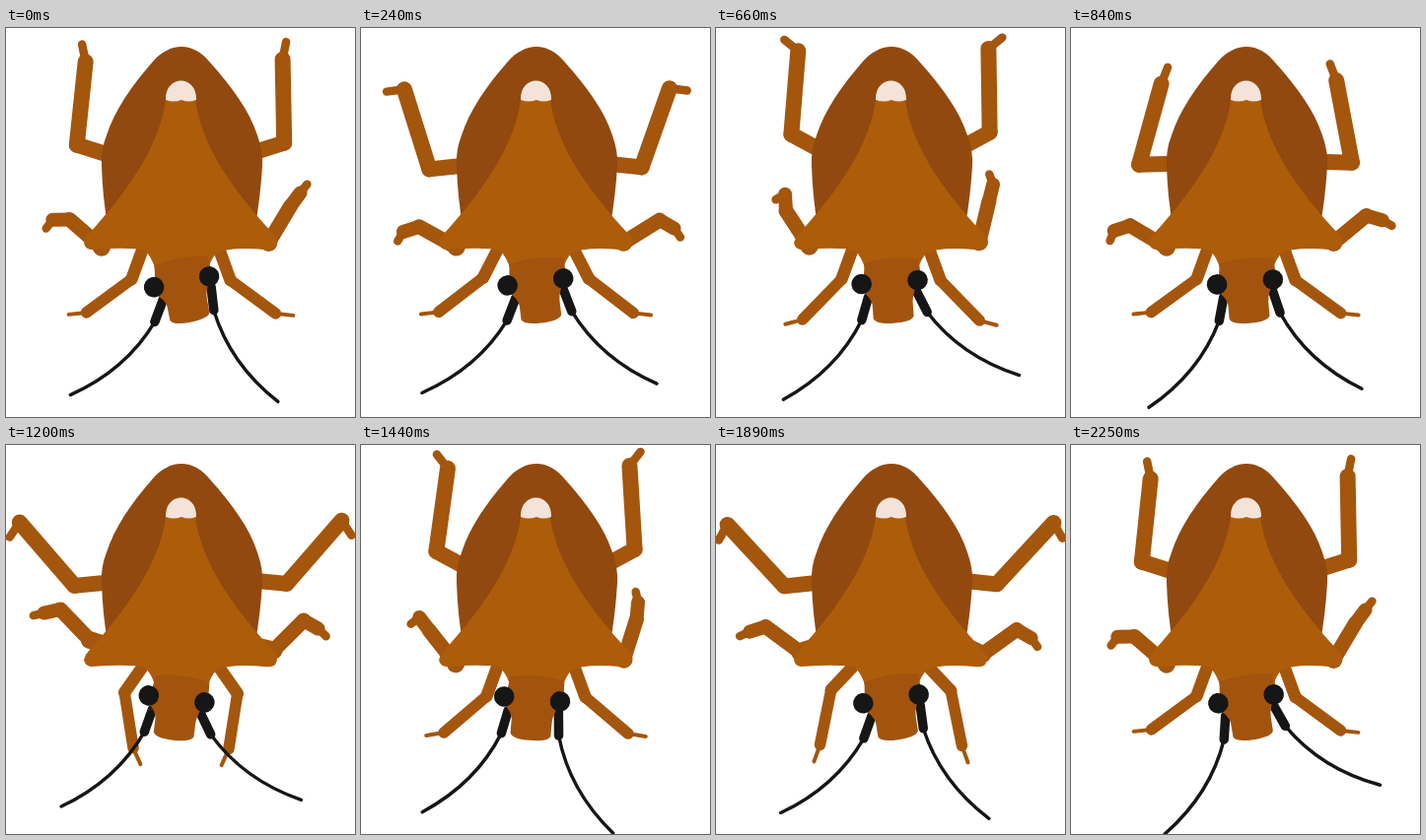
An HTML page with a canvas that plays this animation: 354x395 px, repeating every 2.28 s.

```html
<!DOCTYPE html>
<html lang="en">
<head>
<meta charset="utf-8">
<title>Walking bug</title>
<style>
  html, body { margin: 0; width: 100%; height: 100%; overflow: hidden; background: #fff; }
  canvas { display: block; }
</style>
</head>
<body>
<canvas id="stage" width="354" height="395"></canvas>
<script>
const ctx = document.getElementById('stage').getContext('2d');
const RAD = Math.PI / 180;
const STEP = 30, FRAMES = 76, STRIDE = 25;
const COLOR = {
  leg: '#a4560d', abdomen: '#91490f', shield: '#ad5c0a',
  head: '#a2540e', spot: '#f3e3d9', dark: '#161616'
};

// Rises to 1 once per stride, at peak; a higher sharpness makes it shorter.
const pulse = (phase, peak, sharpness) =>
  ((1 + Math.cos(2 * Math.PI * (phase - peak) / STRIDE)) / 2) ** sharpness;

// A limb segment: its resting angle plus swings of [degrees, peak, sharpness].
const segment = (width, length, rest, ...swings) => ({
  width, length,
  angle: phase => RAD * swings.reduce(
    (sum, [amount, peak, sharpness]) => sum + amount * pulse(phase, peak, sharpness), rest)
});

// Angles are those of a right leg; side -1 mirrors them.
const hindLeg = (side, x, y, tuck) => ({ side, x, y, segments: [
  segment(16, 61, 6, [-35, 22.5, 4]),
  segment(16, 85, -47, [-tuck, 1, 1], [13, 0, 20]),
  segment(8.5, 18, 61, [-130, 1, 1], [-50, 3, 10])
] });

const frontLeg = (side, x, y) => ({ side, x, y, segments: [
  segment(12.5, 31, 70, [-24, 12.3, 4]),
  segment(11.5, 57, 36, [66, 16, 3]),
  segment(4, 18, 6, [115, 16, 4])
] });

const middleLeg = (side, x, y, coxa, femur, tibia, tarsus) => ({ side, x, y, segments: [
  segment(18, 20, ...coxa),
  segment(15, 43, ...femur),
  segment(14, 17, ...tibia),
  segment(8.5, 11, ...tarsus)
] });

const legs = [
  hindLeg(-1, 130, 137, 63),
  hindLeg(1, 224, 135, 58),
  middleLeg(-1, 104, 204,
    [69, [-92, 16, 4]], [-29, [-34, 19.5, 2]], [18, [-130, 20.5, 6]], [70, [-60, 17, 1]]),
  middleLeg(1, 252, 204,
    [44, [-33, 16, 4]], [-32, [-46, 21, 2]], [30, [-115, 23, 5]], [55, [-165, 22, 3]]),
  frontLeg(-1, 138, 226),
  frontLeg(1, 217, 227)
];

// Key poses: frame, head angle, left and right antenna angles.
const poses = [
  [0, -11, 146, 70], [16, -3, 139, 33], [28, -5, 130, 52], [40, 7, 127, 33],
  [48, 5, 126, 60], [63, -9, 143, 67], [75, -9, 127, 45]
];

function poseAt(frame) {
  const next = Math.max(1, poses.findIndex(p => p[0] >= frame));
  const from = poses[next - 1], to = poses[next];
  const u = (frame - from[0]) / (to[0] - from[0]);
  const eased = (1 - Math.cos(Math.PI * u)) / 2;
  return from.map((v, i) => v + (to[i] - v) * eased);
}

const abdomen = new Path2D(`M178 19 C189 19 199 25 207 35 C230 61 247 84 255 109
  Q261 126 260 140 Q258 172 253 200 L103 200 Q98 172 97 140 Q96 124 102 109
  C110 84 127 59 149 34 C157 25 167 19 178 19Z`);
const shield = new Path2D(`M162 73 L192 73 C198 118 228 163 273 211 Q277 217 273 223
  Q270 226 262 225 Q226 222 213 229 Q208 235 205 244 L151 244 Q148 233 141 226
  Q128 222 86 225 Q80 224 79 218 Q80 213 84 209 C126 163 156 118 162 73Z`);
const spot = new Path2D('M162 73 C161 47 194 47 193 73 Q185 76 178 73 Q170 76 162 73Z');
const head = new Path2D(`M-24 -5 Q2 -11 31 -5 L32 14 Q22 28 22 38 L22 52
  Q20 58 1 58 Q-17 58 -19 52 L-19 38 Q-20 30 -28 24Z`);

function fill(path, color) {
  ctx.fillStyle = color;
  ctx.fill(path);
}

function disc(x, y, r, color) {
  ctx.fillStyle = color;
  ctx.beginPath();
  ctx.arc(x, y, r, 0, 2 * Math.PI);
  ctx.fill();
}

function line(x0, y0, x1, y1, width) {
  ctx.lineWidth = width;
  ctx.beginPath();
  ctx.moveTo(x0, y0);
  ctx.lineTo(x1, y1);
  ctx.stroke();
}

function drawLeg({ side, x, y, segments }, phase) {
  ctx.strokeStyle = COLOR.leg;
  for (const { width, length, angle } of segments) {
    const a = angle(phase);
    const nx = x + side * length * Math.cos(a), ny = y + length * Math.sin(a);
    line(x, y, nx, ny, width);
    [x, y] = [nx, ny];
  }
}

function drawAntenna(x, y, side, angle) {
  ctx.save();
  ctx.translate(x, y);
  ctx.rotate(angle * RAD);
  ctx.scale(1, side);
  ctx.strokeStyle = COLOR.dark;
  line(-4, -2, 18, 8, 9.5);
  ctx.lineWidth = 3.4;
  ctx.beginPath();
  ctx.moveTo(18, 8);
  ctx.quadraticCurveTo(73, 22, 131, 0);
  ctx.stroke();
  ctx.restore();
}

function drawHead(frame) {
  const [, sway, left, right] = poseAt(frame);
  ctx.save();
  ctx.translate(175, 242);
  ctx.rotate(sway * RAD);
  drawAntenna(-24, 34, -1, left);
  drawAntenna(28, 31, 1, right);
  fill(head, COLOR.head);
  disc(-28.5, 16, 10.3, COLOR.dark);
  disc(28.5, 16, 10.3, COLOR.dark);
  ctx.restore();
}

function draw(now) {
  const frame = Math.floor(now / STEP) % FRAMES;
  ctx.fillStyle = '#fff';
  ctx.fillRect(0, 0, 354, 395);
  ctx.lineCap = ctx.lineJoin = 'round';
  legs.forEach(leg => drawLeg(leg, frame % STRIDE));
  fill(abdomen, COLOR.abdomen);
  fill(shield, COLOR.shield);
  fill(spot, COLOR.spot);
  drawHead(frame);
}

const start = performance.now();
function tick() {
  draw(performance.now() - start);
  requestAnimationFrame(tick);
}
tick();
</script>
</body>
</html>
```
